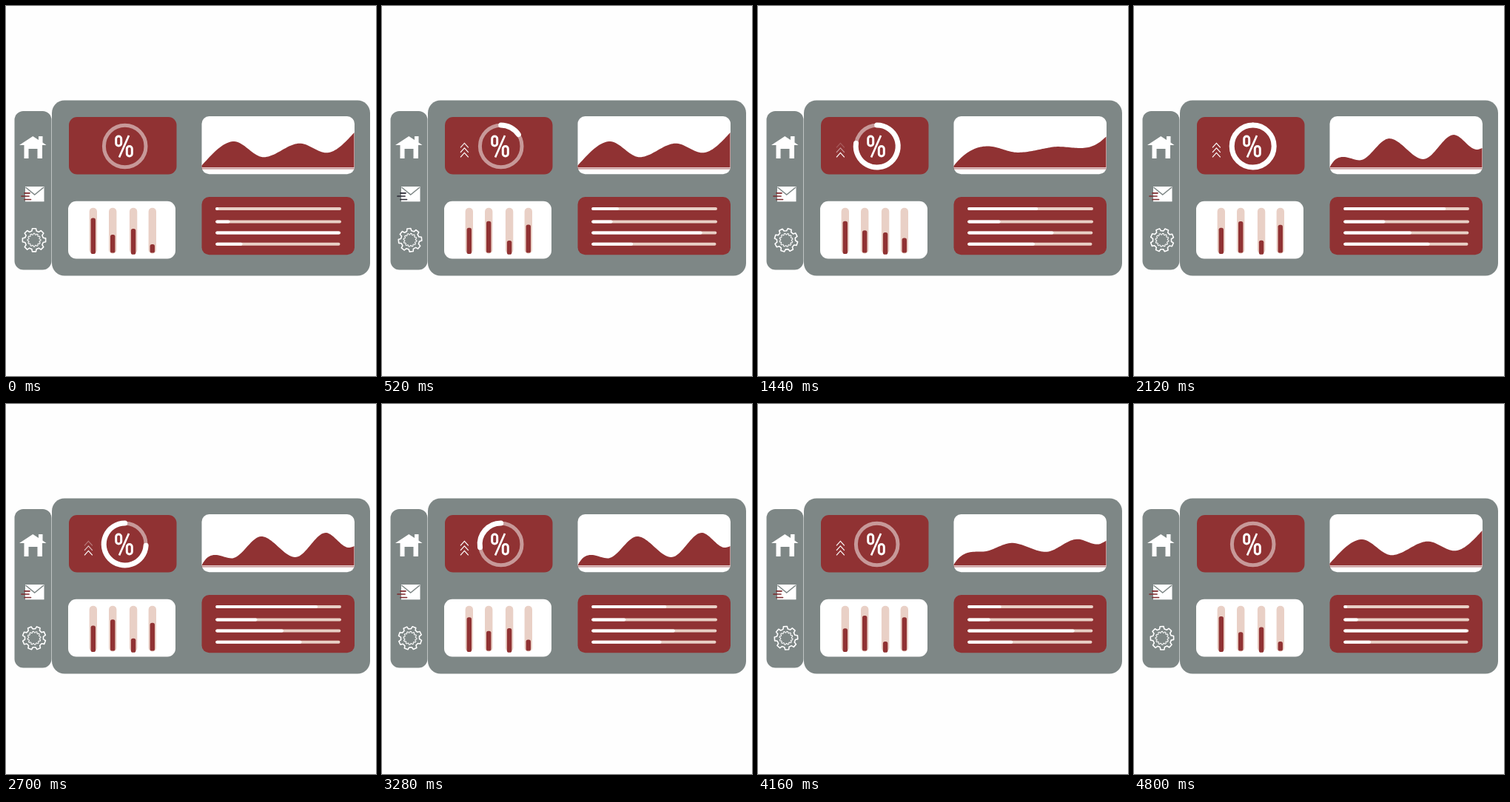
Write an HTML page that moves like this. It is 500 by 500 pixels and loops after 4820 ms.

```html
<!DOCTYPE html>
<html lang="en">
<head>
<meta charset="utf-8">
<title>Dashboard</title>
<style>
  html, body { margin: 0; width: 100%; height: 100%; overflow: hidden; background: #fefefe; }
  svg { display: block; width: 100%; height: 100%; }
  .grey { fill: #7e8786; }
  .red { fill: #903233; }
  .white { fill: #fff; }
  .line { fill: none; stroke: #fff; }
  .round { stroke-linecap: round; stroke-linejoin: round; }
</style>
</head>
<body>
<svg viewBox="0 0 500 500">
  <rect class="grey" x="11.5" y="142" width="50" height="214.5" rx="12"/>
  <rect class="grey" x="62" y="127.500" width="430" height="237" rx="17"/>

  <path class="white" d="M18 188 36.300 176 44 181V176H49.500V184.500L54.500 188H49V206H42.500V193H30.500V206H24.500V188Z"/>

  <rect class="white" x="26" y="244" width="25.5" height="20.300"/>
  <path d="M26.500 245 38.700 255 51 245" fill="none" stroke="#7e8786" stroke-width="1.600"/>
  <path id="speed" class="round" d="M25 252.800H32M21 257H31M25 261.500H33.500" fill="none" stroke-width="1.700"/>

  <g id="gear" class="line round">
    <path id="outerGear" stroke-width="1.600"/>
    <path id="innerGear" stroke-width="1"/>
  </g>

  <rect class="red" x="85" y="150" width="145.500" height="77.500" rx="11"/>
  <circle class="line" cx="160.700" cy="189.500" r="28.300" stroke-width="5" stroke-opacity=".5"/>
  <path id="ring" class="line round" stroke-width="7"/>
  <g class="line" stroke-width="3">
    <rect x="148.700" y="176" width="7" height="13" rx="3.500"/>
    <rect x="163.300" y="189.500" width="7" height="13.500" rx="3.500"/>
    <path d="M166 175 153 204.500" stroke-width="2.700"/>
  </g>
  <g id="chevrons" class="line" stroke-width="1.200">
    <path d="M106 204.300 111.400 198.300 116.800 204.300"/>
    <path d="M106 197.800 111.400 191.800 116.800 197.800"/>
    <path d="M106 191.300 111.400 185.300 116.800 191.300"/>
  </g>

  <rect class="white" x="264.500" y="149" width="206.500" height="78.300" rx="10"/>
  <path id="area" class="red"/>
  <path d="M264.500 219.900H470.500" stroke="#903233" stroke-width=".8"/>

  <rect class="white" x="84" y="263.700" width="145" height="77.800" rx="11"/>
  <g id="bars"></g>

  <rect class="red" x="264.500" y="258" width="206.500" height="78.300" rx="10"/>
  <g id="sliders" class="round" fill="none" stroke-width="4"></g>
</svg>
<script>
const LOOP = 4820, PINK = '#e9d0c6';
const $ = id => document.getElementById(id);
const clamp = x => Math.min(1, Math.max(0, x));
const ramp = (t, from, to) => clamp((t - from) / (to - from));
const smooth = x => x * x * (3 - 2 * x);
const mix = (a, b, k) => a + (b - a) * k;
const triangle = (t, period) => 1 - Math.abs(1 - 2 * (t % period) / period);

function add(parent, tag, attrs) {
  const el = document.createElementNS('http://www.w3.org/2000/svg', tag);
  for (const key in attrs) el.setAttribute(key, attrs[key]);
  return parent.appendChild(el);
}

function gearPath(teeth, root, tip) {
  const points = [];
  for (let i = 0; i < teeth; i++) {
    for (const [offset, r] of [[-.32, root], [-.2, tip], [.2, tip], [.32, root]]) {
      const a = (i + offset) / teeth * 2 * Math.PI;
      points.push((r * Math.sin(a)).toFixed(2) + ' ' + (-r * Math.cos(a)).toFixed(2));
    }
  }
  return 'M' + points.join('L') + 'Z';
}
$('outerGear').setAttribute('d', gearPath(8, 12.6, 15.8));
$('innerGear').setAttribute('d', gearPath(12, 7.4, 9));

// Bars: centre x, bottom, top at rest, top at full swing
const bars = [
  [117.8, 335, 286.5, 307], [144.2, 333.5, 309, 281],
  [172.1, 335.8, 301, 325.5], [197.8, 333.5, 322, 281]
].map(([x, bottom, from, to]) => {
  add($('bars'), 'rect', { x: x - 5.2, y: 272.7, width: 10.4, height: 61.8, rx: 5, fill: PINK });
  const el = add($('bars'), 'rect', { x: x - 3.2, width: 6.4, rx: 2.6, class: 'red' });
  return { el, bottom, from, to };
});

// Sliders: y, track end, fill end at rest, fill end at full swing
const sliders = [
  [274, 451, 285.5, 438], [291.4, 451, 301, 343],
  [306.5, 450.3, 450, 363], [321.8, 449.5, 318, 409]
].map(([y, end, from, to]) => {
  add($('sliders'), 'path', { d: `M285.300 ${y}H${end}`, stroke: PINK });
  return { el: add($('sliders'), 'path', { stroke: '#fff' }), y, from, to };
});

// Chart knots: x, y, slope
const calm = [[264.5, 215.5, -1.1], [308, 183, 0], [348, 204.3, 0], [397, 185.7, 0], [433, 198.3, 0], [470.5, 171, -1.1]];
const steep = [[264.5, 218, -2], [283, 204, 0], [305, 208.5, 0], [345, 179, 0], [391, 207, 0], [432, 174, 0], [463, 194, 0], [470.5, 192, -.5]];

function curveY(knots, x) {
  let i = 1;
  while (i < knots.length - 1 && knots[i][0] < x) i++;
  const [x0, y0, m0] = knots[i - 1], [x1, y1, m1] = knots[i];
  const w = x1 - x0, u = (x - x0) / w, v = 1 - u;
  return mix(y0, y1, smooth(u)) + w * u * v * (m0 * v - m1 * u);
}

function areaPath(k) {
  let d = 'M264.5 218.300';
  for (let x = 264.5; x <= 470.5; x += 2) {
    d += `L${x} ${mix(curveY(calm, x), curveY(steep, x), k).toFixed(2)}`;
  }
  return d + 'V218.300Z';
}

function ringPath(start, end) {
  if (end - start < .004) return '';
  const at = f => {
    const a = f * 2 * Math.PI;
    return `${160.7 + 28.5 * Math.sin(a)} ${189.5 - 28.5 * Math.cos(a)}`;
  };
  const arc = f => `A28.5 28.5 0 0 1 ${at(f)}`;
  return `M${at(start)}${arc((start + end) / 2)}${arc(end)}`;
}

const fadeIn = [[0, 200], [100, 370], [150, 560]];

function draw(t) {
  $('gear').setAttribute('transform', `translate(38 316.300) rotate(${t / LOOP * 360})`);

  const dark = Math.sin(Math.PI * ramp(t, 0, 1080));
  $('speed').setAttribute('stroke', `rgb(${mix(125, 40, dark)},${mix(42, 38, dark)},${mix(45, 50, dark)})`);

  $('ring').setAttribute('d', ringPath(smooth(ramp(t, 2100, 3900)), smooth(ramp(t, 0, 2085))));

  const beat = t % (LOOP / 4);
  fadeIn.forEach(([from, to], i) => {
    $('chevrons').children[i].setAttribute('opacity', ramp(beat, from, to) * (1 - ramp(beat, 1000, 1180)));
  });

  $('area').setAttribute('d', areaPath(smooth(ramp(t, 1085, 2150)) - smooth(ramp(t, 3730, 4800))));

  for (const { el, bottom, from, to } of bars) {
    const top = mix(from, to, triangle(t, LOOP / 3));
    el.setAttribute('y', top);
    el.setAttribute('height', bottom - top);
  }
  for (const { el, y, from, to } of sliders) {
    el.setAttribute('d', `M285.300 ${y}H${mix(from, to, triangle(t, LOOP)) - .5}`);
  }
}

function frame() {
  draw(performance.now() % LOOP);
  requestAnimationFrame(frame);
}
frame();
</script>
</body>
</html>
```
